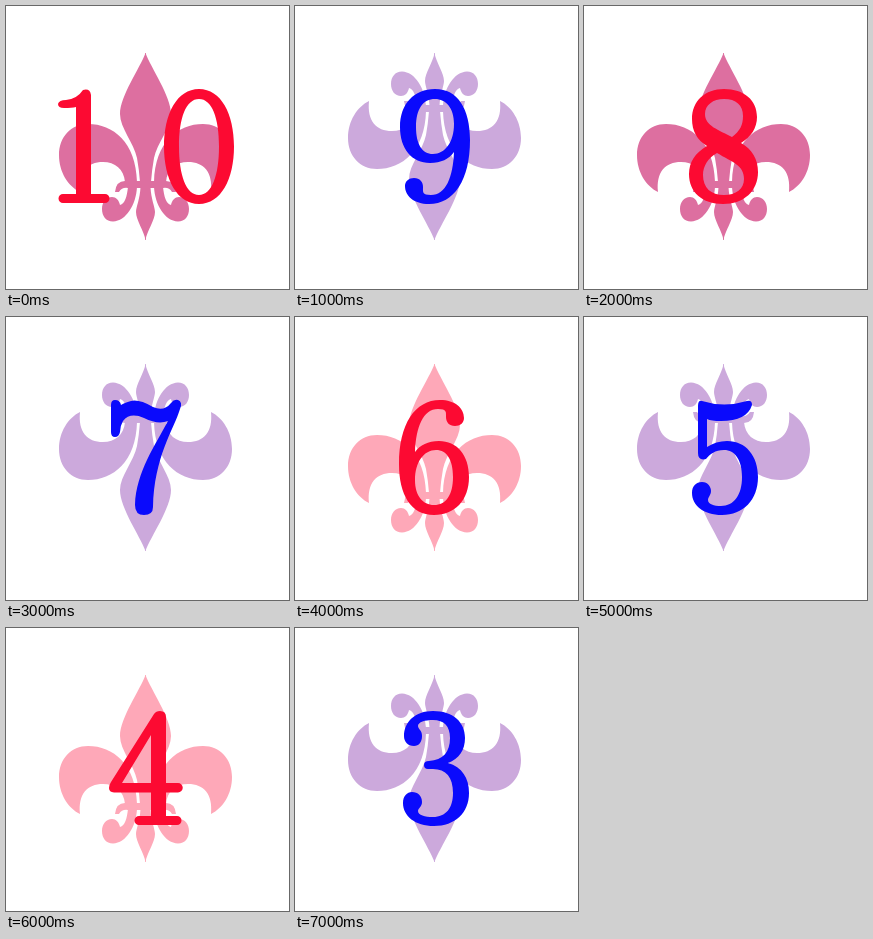
Write an HTML page with a canvas that moves like this. It is 283 px wide and 283 px high and loops after 8000 ms.

```html
<!DOCTYPE html>
<html lang="en">
<head>
<meta charset="utf-8">
<title>Countdown</title>
<style>
html, body { margin: 0; width: 100%; height: 100%; overflow: hidden; background: #fff; }
canvas { display: block; }
</style>
</head>
<body>
<canvas id="stage" width="283" height="283" role="img" aria-label="Countdown from 10 to 3"></canvas>
<script>
const ctx = document.getElementById('stage').getContext('2d');
const CENTER_X = 139.5, CENTER_Y = 140.5, STEP = 1000;
const RED = '#fc0a32', BLUE = '#0a0afc';
const ROSE = '#dd6fa0', LILAC = '#cca9dc', BLUSH = '#fea8b8';

// Left half of the lily; the right half is its mirror image.
const lilyParts = [
  // central petal
  'M140 47 L139.5 47 C134 62 114 90 114 108 C114 122 128 137 131 152 Q133 163 134 176 H140Z',
  // side petal
  'M74 186 C62 180 53 166 53 149 C53 131 65 118 82 118 C107 118 130 136 131 176 H119 C118 163 109 156 97 156 C81 156 72 166 74 186Z',
  // band
  'M109 186 Q110 175 119 175 H140 V182 H122 Q116 181 113 186Z',
  // curl
  'M131 181 C130 199 120 215 107 215.5 C100 215.5 96 210 96 203 C96 196 100 191 106 191 C110 191 113 194 114 199 C119 198 121 190 122 181Z',
  // lower point
  'M140 181 V234 H139.5 C138 225 130 214 130 206 C130 201 134 193 134.5 181Z'
].map(d => new Path2D(d));

const nine = 'M140 83 C163 83 175 103 175 134 C175 174 159 198 134 198 C119 198 110 190 110 180 C110 175 114 172 119 172 C125 172 128 176 128 181 C128 186 127 189 136 189 C151 189 158 171 159 146 C154 153 146 157 135 157 C117 157 105 143 105 121 C105 98 119 83 140 83Z M140 93 C128 93 121 103 121 121 C121 138 127 148 138 148 C150 148 159 136 159 118 C159 102 151 93 140 93Z';

const numerals = {
  10: 'M77 84 Q84 82 85 89 V188 H99 a4.5 4.5 0 0 1 0 9 H57 a4.5 4.5 0 0 1 0 -9 H70 V101 Q66 102 58 102 Q52 102 52 98 Q53 94 60 94 Q71 93 77 84Z M193 83 C215 83 228 108 228 140.5 S215 198 193 198 158 173 158 140.5 171 83 193 83Z M193 93 C180 93 173 112 173 140.5 S180 189 193 189 213 169 213 140.5 206 93 193 93Z',
  9: nine,
  8: 'M140 83 C160 83 173 94 173 111 C173 122 167 131 157 137 C168 143 174 153 174 166 C174 185 160 198 139 198 C118 198 105 186 105 168 C105 156 111 147 123 140 C113 134 108 125 108 113 C108 95 121 83 140 83Z M140 93 C129 93 121 99 121 108 C121 120 135 124 148 131 C156 125 159 119 159 110 C159 99 152 93 140 93Z M133 147 C124 152 119 160 119 169 C119 182 127 189 140 189 C152 189 160 183 160 173 C160 159 148 156 133 147Z',
  7: 'M109 83 Q114 83 115 88 Q118 86 125 84 Q133 82 147 90 Q158 95 165 86 Q168 82 172 83 Q177 85 174 92 C168 112 148 140 147 190 Q147 198 138 198 Q129 198 129 188 C130 155 150 127 162 104 Q152 108 138 101 Q124 95 117 104 Q114 109 114 115 Q113 120 109 120 Q105 120 105 115 V88 Q105 83 109 83Z',
  6: nine,
  5: 'M118 84 Q140 91 163 84 Q168 83 168 88 Q163 104 137 104 Q127 104 123 102 V130 Q132 124 143 124 C162 124 174 139 174 160 C174 183 159 198 138 198 C119 198 108 188 108 176 C108 169 112 165 118 165 C124 165 127 170 127 174 C127 178 124 180 124 183 C124 187 130 189 137 189 C150 189 158 178 158 160 C158 143 151 133 140 133 C131 133 126 137 122 142 Q114 144 114 136 V89 Q114 83 118 84Z',
  4: 'M148 86 Q150 83 154 83 Q160 83 160 89 V155 H172 a4.5 4.5 0 0 1 0 9.5 H160 V188 H171 a4.5 4.5 0 0 1 0 9 H133 a4.5 4.5 0 0 1 0 -9 H145 V164.5 H108 Q103 164 103 160 Q103 157 105 154Z M145 107 L116 155 H145Z',
  3: 'M138 83 C158 83 170 94 170 110 C170 122 164 131 153 135 C167 139 174 150 174 165 C174 185 160 198 139 198 C120 198 108 188 108 175 C108 168 112 164 117 164 C123 164 127 168 127 174 C127 179 123 180 123 183 C123 187 130 189 138 189 C151 189 158 180 158 165 C158 149 151 141 138 141 H133 Q129 141 129 137 Q129 133 134 133 C148 132 155 124 155 110 C155 98 149 92 138 92 C130 92 123 94 123 98 C123 101 127 102 127 108 C127 114 124 118 119 118 C113 118 109 114 109 108 C109 94 120 83 138 83Z'
};
for (const n in numerals) numerals[n] = new Path2D(numerals[n]);

function transformed(scaleX, scaleY, draw) {
  ctx.save();
  ctx.translate(CENTER_X, CENTER_Y);
  ctx.scale(scaleX, scaleY);
  ctx.translate(-CENTER_X, -CENTER_Y);
  draw();
  ctx.restore();
}

function drawLily(color, direction) {
  ctx.fillStyle = color;
  for (const side of [1, -1]) {
    transformed(side, direction, () => lilyParts.forEach(part => ctx.fill(part)));
  }
}

function drawNumeral(number, color) {
  const turn = number === 6 ? -1 : 1;
  ctx.fillStyle = color;
  transformed(turn, turn, () => ctx.fill(numerals[number], 'evenodd'));
}

function render(time) {
  const number = 10 - Math.floor(time / STEP) % 8;
  const odd = number % 2 === 1;
  ctx.fillStyle = '#fff';
  ctx.fillRect(0, 0, 283, 283);
  drawLily(odd ? LILAC : number >= 8 ? ROSE : BLUSH, odd ? -1 : 1);
  drawNumeral(number, odd ? BLUE : RED);
}

const start = performance.now();
function tick() {
  render(performance.now() - start);
  requestAnimationFrame(tick);
}
tick();
</script>
</body>
</html>
```
